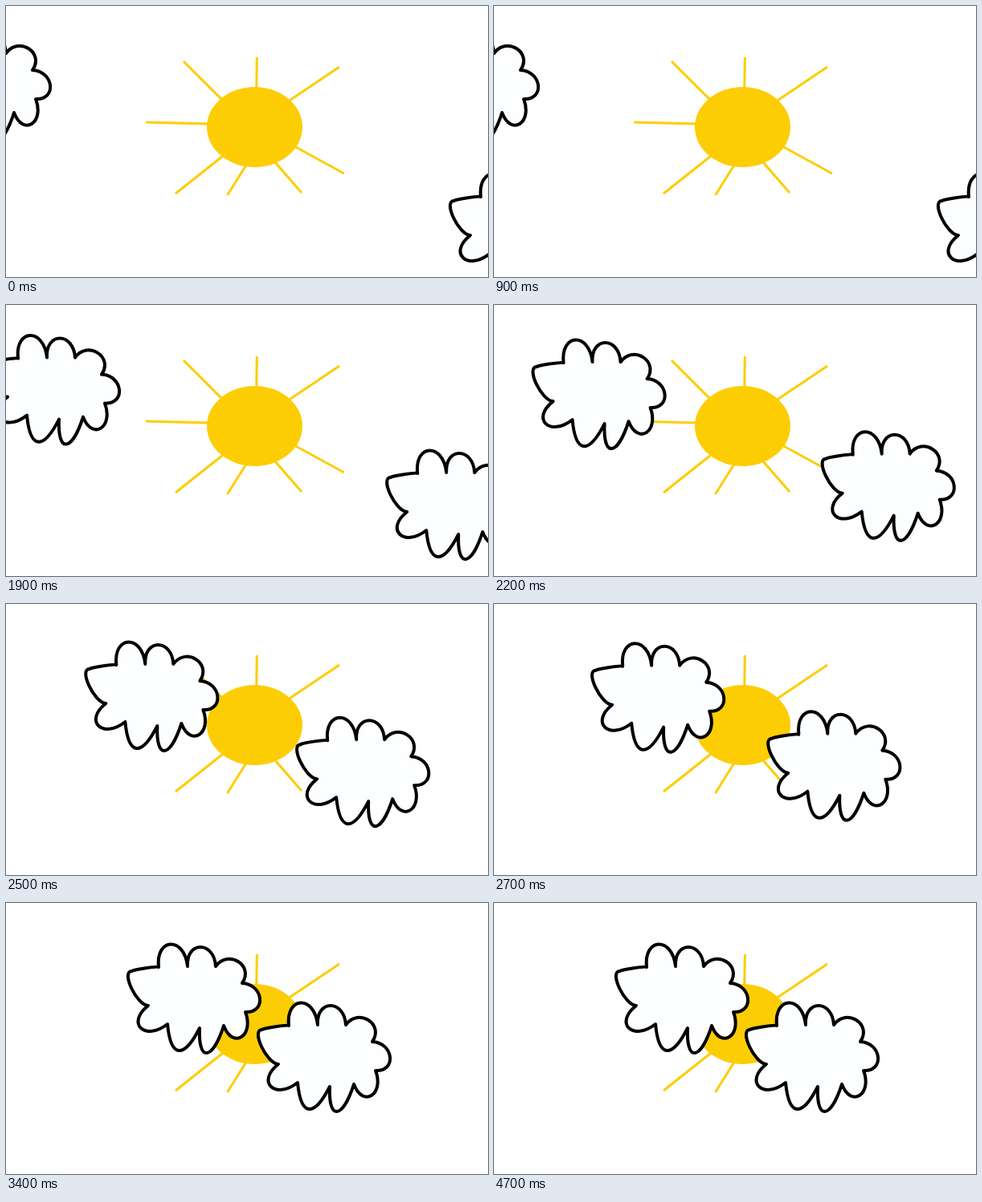
An HTML page with a canvas for the animation above (4800 ms loop, 600 by 338 pixels).

```html
<!DOCTYPE html>
<html lang="en">
<head>
<meta charset="utf-8">
<title>Clouds over the sun</title>
<style>
html, body { margin: 0; width: 100%; height: 100%; overflow: hidden; background: #fff; }
canvas { display: block; width: 600px; height: 338px; }
</style>
</head>
<body>
<canvas id="stage" width="600" height="338"></canvas>
<script>
const ctx = document.getElementById('stage').getContext('2d');
const LOOP = 4800, STEP = 100, MOVE_START = 1400, MOVE_TIME = 2000;
const YELLOW = '#fdcd03';

// A lobe arches from the previous notch through its tip to the next notch.
// Handles lie parallel to the base; a smaller spread makes the lobe more pointed.
function buildCloud(x, y) {
  const path = new Path2D();
  path.moveTo(x, y);
  function lobe(tipX, tipY, endX, endY, spread = 0.5) {
    const midX = (8 * tipX - x - endX) / 6, midY = (8 * tipY - y - endY) / 6;
    const dx = spread * (endX - x), dy = spread * (endY - y);
    path.bezierCurveTo(midX - dx, midY - dy, midX + dx, midY + dy, endX, endY);
    x = endX;
    y = endY;
  }
  lobe(172, 81.5, 157, 85);
  lobe(156, 106, 177, 128);
  lobe(168, 156, 201, 151);
  lobe(215, 184, 241, 156, 0.2);
  lobe(250, 187, 271, 153, 0.3);
  lobe(293, 167, 298, 136);
  lobe(316, 119, 294, 100);
  lobe(289, 73, 261, 79);
  lobe(242, 55, 226, 79);
  lobe(205, 51.5, 190, 80);
  return path;
}
const cloud = buildCloud(190, 80);

// Cubic ease with control points (0.23, 0) and (0.34, 1).
function ease(x) {
  if (x <= 0) return 0;
  if (x >= 1) return 1;
  let lo = 0, hi = 1;
  for (let i = 0; i < 30; i++) {
    const s = (lo + hi) / 2, r = 1 - s;
    if (0.69 * s * r * r + 1.02 * s * s * r + s * s * s < x) lo = s;
    else hi = s;
  }
  return lo * lo * (3 - 2 * lo);
}

// A ray runs inward from its tip and ends hidden under the disc.
function ray(x, y, degrees) {
  const angle = degrees * Math.PI / 180;
  ctx.moveTo(x, y);
  ctx.lineTo(x + 90 * Math.cos(angle), y + 90 * Math.sin(angle));
}

function drawSun() {
  ctx.fillStyle = ctx.strokeStyle = YELLOW;
  ctx.lineWidth = 3;
  ctx.beginPath();
  ray(221, 69, 45);
  ray(312.3, 64, 90.8);
  ray(415, 76, 146);
  ray(174, 145, 1.5);
  ray(211, 234, -38.5);
  ray(275.5, 236, -58);
  ray(368, 233, -131);
  ray(421, 209, -151.3);
  ctx.stroke();
  ctx.beginPath();
  ctx.ellipse(309.5, 151, 59.5, 50, 0, 0, Math.PI * 2);
  ctx.fill();
}

function drawCloud(x, y) {
  ctx.save();
  ctx.translate(x, y);
  ctx.fillStyle = '#fdfeff';
  ctx.fill(cloud);
  ctx.strokeStyle = '#000';
  ctx.lineWidth = 4;
  ctx.lineCap = ctx.lineJoin = 'round';
  ctx.stroke(cloud);
  ctx.restore();
}

function draw(now) {
  const t = Math.floor((now % LOOP) / STEP) * STEP;
  const away = 1 - ease((t - MOVE_START) / MOVE_TIME);
  ctx.fillStyle = '#fff';
  ctx.fillRect(0, 0, 600, 338);
  drawSun();
  drawCloud(-261 * away, -20 * away);
  drawCloud(162 + 239 * away, 73 + 85 * away);
}

const start = performance.now();
function tick() {
  draw(performance.now() - start);
  requestAnimationFrame(tick);
}
tick();
</script>
</body>
</html>
```
